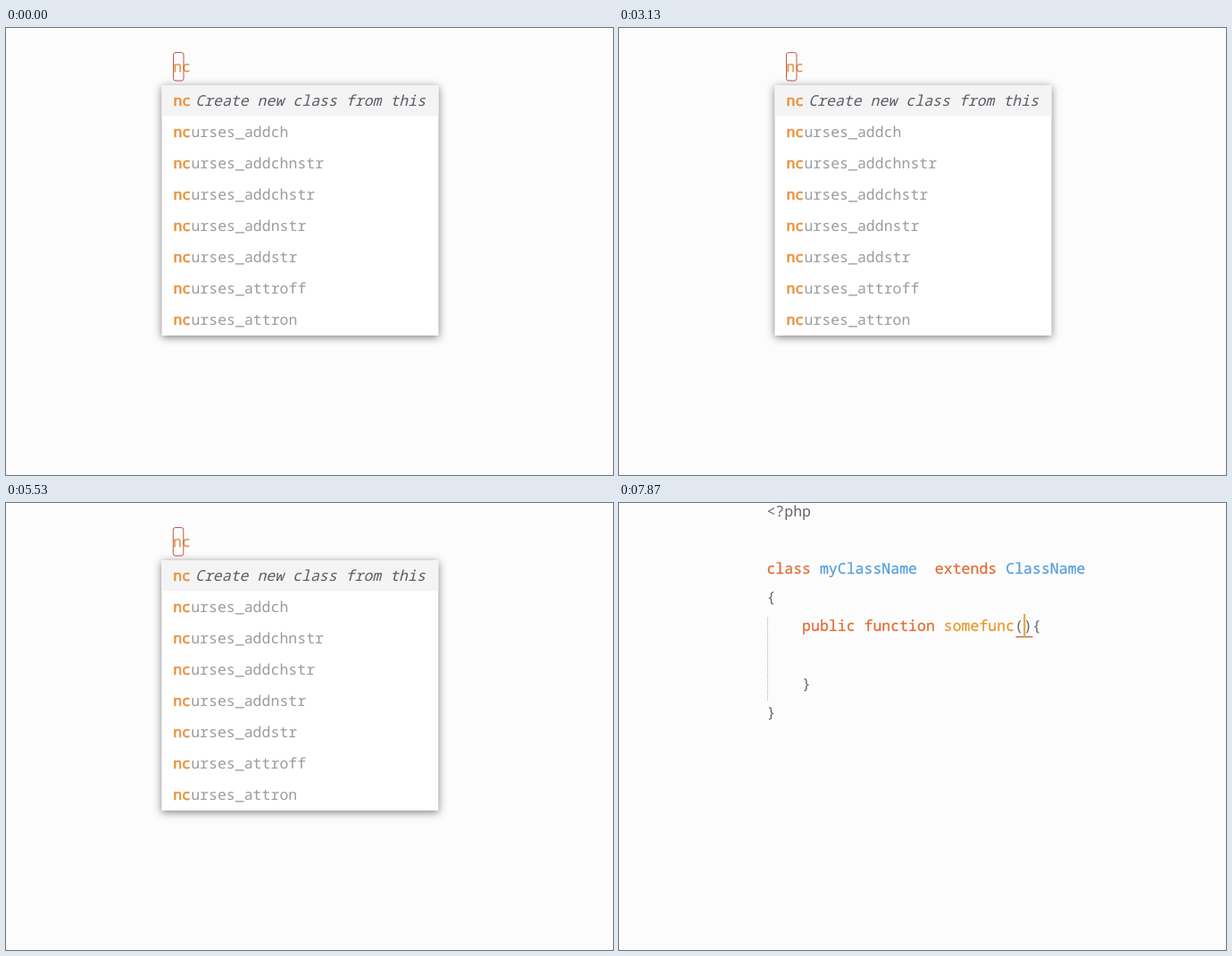
Recreate the animation shown at these times as an HTML page. Size 680x500 px, loop 8000 ms.

```html
<!DOCTYPE html>
<html lang="en">
<head>
<meta charset="utf-8">
<title>Code completion</title>
<style>
  html, body { margin: 0; width: 100%; height: 100%; overflow: hidden; background: #fcfcfc; }
  svg { display: block; width: 680px; height: 500px; }
  text {
    font: 16.55px "Noto Sans Mono", "DejaVu Sans Mono", monospace;
    white-space: pre;
    text-rendering: geometricPrecision;
    fill: #64676a;
  }
  .panel { fill: #fff; filter: drop-shadow(0 2.5px 5px rgba(0, 0, 0, .5)); }
  .item { fill: #9a9c9d; }
  .hit { fill: #e8923f; stroke: #e8923f; stroke-width: .6px; }
  .hint { fill: #5a5c66; font-style: italic; }
  .key { fill: #e06c34; stroke: #e06c34; stroke-width: .25px; }
  .type { fill: #559ddd; stroke: #559ddd; stroke-width: .25px; }
  .name { fill: #e8992a; stroke: #e8992a; stroke-width: .25px; }
  .typed { fill: #e8954c; stroke: #e8954c; stroke-width: .25px; }
</style>
</head>
<body>
<svg viewBox="0 0 680 500">
  <g id="popup">
    <text class="typed" x="187.2" y="49">nc</text>
    <rect x="187.5" y="27.5" width="11.5" height="31.5" rx="2.5" fill="none" stroke="#bb5a48"/>
    <rect class="panel" x="174.5" y="64" width="310" height="280"/>
    <rect x="174.5" y="64" width="310" height="34.5" fill="#f4f4f4"/>
    <text class="hit" x="187.4" y="87">nc</text>
    <text class="hint" x="212.2" y="87">Create new class from this</text>
  </g>
  <g id="code">
    <path d="M166.5 128V221" stroke="#b4b4b4" stroke-dasharray="1 1"/>
    <text x="165.4" y="14.8">&lt;?php</text>
    <text x="165.4" y="79"><tspan class="key">class </tspan><tspan class="type">myClassName  </tspan><tspan class="key">extends </tspan><tspan class="type">ClassName</tspan></text>
    <text x="165.4" y="111.1">{</text>
    <text x="165.4" y="143.3"><tspan class="key">    public function </tspan><tspan class="name">somefunc</tspan>(){</text>
    <text x="165.4" y="207.6">    }</text>
    <text x="165.4" y="239.7">}</text>
    <path d="M444.5 149.7H463.5" stroke="#c5794a" stroke-width="1.6"/>
    <path d="M454.3 124V150" stroke="#dda338" stroke-width="2"/>
  </g>
</svg>
<script>
  const LOOP = 8000, STEP = 1000 / 15, PAGE = 691;
  const popup = document.getElementById('popup');
  const code = document.getElementById('code');

  const addText = (cls, x, y, str) => {
    const el = document.createElementNS('http://www.w3.org/2000/svg', 'text');
    el.setAttribute('class', cls);
    el.setAttribute('x', x);
    el.setAttribute('y', y);
    el.textContent = str;
    popup.append(el);
  };

  ['addch', 'addchnstr', 'addchstr', 'addnstr', 'addstr', 'attroff', 'attron'].forEach((fn, i) => {
    const y = 122 + 35 * i;
    addText('hit', 187.4, y, 'nc');
    addText('item', 207.4, y, 'urses_' + fn);
  });

  // Swipes between the two pages: start, end, target page, sharpness
  const swipes = [
    [1200, 1533, 1, 3],
    [2133, 2800, 0, 6.7],
    [3400, 3733, 1, 3],
    [4600, 5133, 0, 4.5],
    [5533, 5800, 1, 3],
    [6533, 6867, 0, 3],
    [7533, 7867, 1, 3]
  ];

  const ease = (u, sharp) => 1 - (1 - u ** 1.4) ** sharp;

  function pageAt(t) {
    let page = 0;
    for (const [start, end, target, sharp] of swipes) {
      if (t < start) break;
      const u = Math.min(1, (t - start) / (end - start));
      page += (target - page) * ease(u, sharp);
    }
    return page;
  }

  function draw(now) {
    const t = Math.floor((now % LOOP + 5) / STEP) * STEP % LOOP;
    const x = -PAGE * pageAt(t);
    popup.setAttribute('transform', `translate(${x.toFixed(1)})`);
    code.setAttribute('transform', `translate(${(x + PAGE).toFixed(1)})`);
  }

  const origin = performance.now();
  (function tick() {
    draw(performance.now() - origin);
    requestAnimationFrame(tick);
  })();
</script>
</body>
</html>
```
